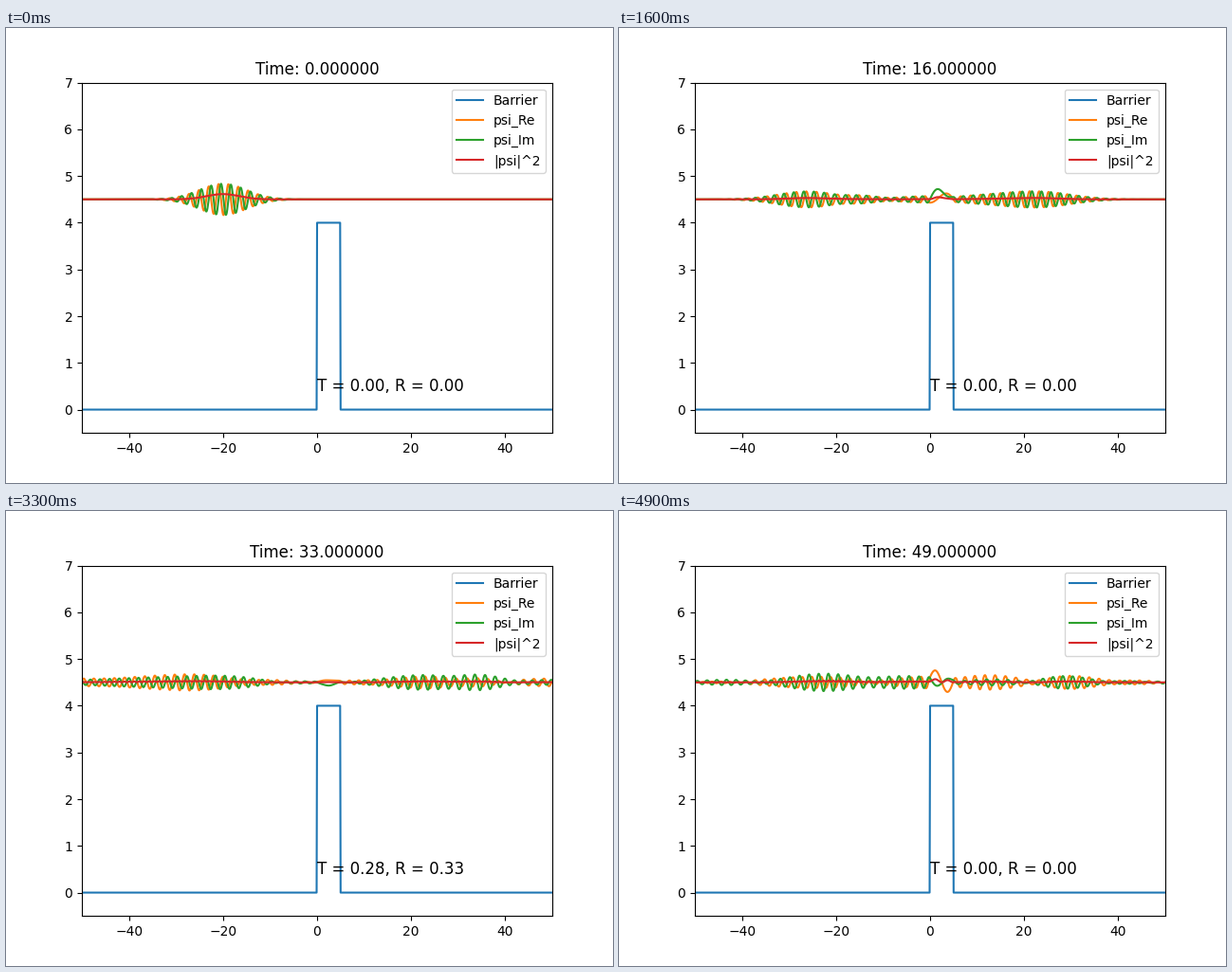
Recreate the animation shown at these times as a matplotlib script. Size 640 by 480 pixels, loop 5 s.

```python
import numpy as np
import matplotlib.pyplot as plt
from matplotlib.animation import FuncAnimation

FRAMES = 50
STEPS = 100          # integration steps per frame
K0, X0, WIDTH = 3.0, -20.0, 5.0
ENERGY = K0**2 / 2
HEIGHT = 4.0

x = np.linspace(-50, 50, 1000, endpoint=False)
dx = x[1] - x[0]
barrier = np.where((x > -dx / 2) & (x < 5 - dx / 2), HEIGHT, 0.0)


def simulate():
    """Split-step evolution of a Gaussian packet on a periodic line."""
    dt = 1 / STEPS
    k = 2 * np.pi * np.fft.fftfreq(x.size, dx)
    half_kick = np.exp(-0.5j * barrier * dt)
    drift = np.exp(-0.5j * k**2 * dt)
    psi = np.exp(-(x - X0)**2 / (2 * WIDTH**2) + 1j * K0 * x)
    psi /= np.sqrt(np.sum(np.abs(psi)**2) * dx)
    states = [psi]
    for _ in range(FRAMES - 1):
        for _ in range(STEPS):
            psi = half_kick * np.fft.ifft(drift * np.fft.fft(half_kick * psi))
        states.append(psi)
    return states


states = simulate()

fig, ax = plt.subplots(figsize=(6.4, 4.8), dpi=100)
ax.set_xlim(-50, 50)
ax.set_ylim(-0.5, 7)
ax.plot(x, barrier, label="Barrier")
waves = [ax.plot([], [], label=name)[0] for name in ("psi_Re", "psi_Im", "|psi|^2")]
ax.legend(loc="upper right")
title = ax.set_title("")
readout = ax.text(0, 0.4, "", fontsize=12)


def update(frame):
    psi = states[frame]
    density = np.abs(psi)**2
    for line, values in zip(waves, (psi.real, psi.imag, density)):
        line.set_data(x, ENERGY + values)
    title.set_text(f"Time: {frame:f}")
    readout.set_text(f"T = {100 * density[-1]:.2f}, R = {100 * density[0]:.2f}")
    return [*waves, title, readout]


anim = FuncAnimation(fig, update, frames=FRAMES, interval=100, repeat=True, repeat_delay=0)
plt.show()
```
